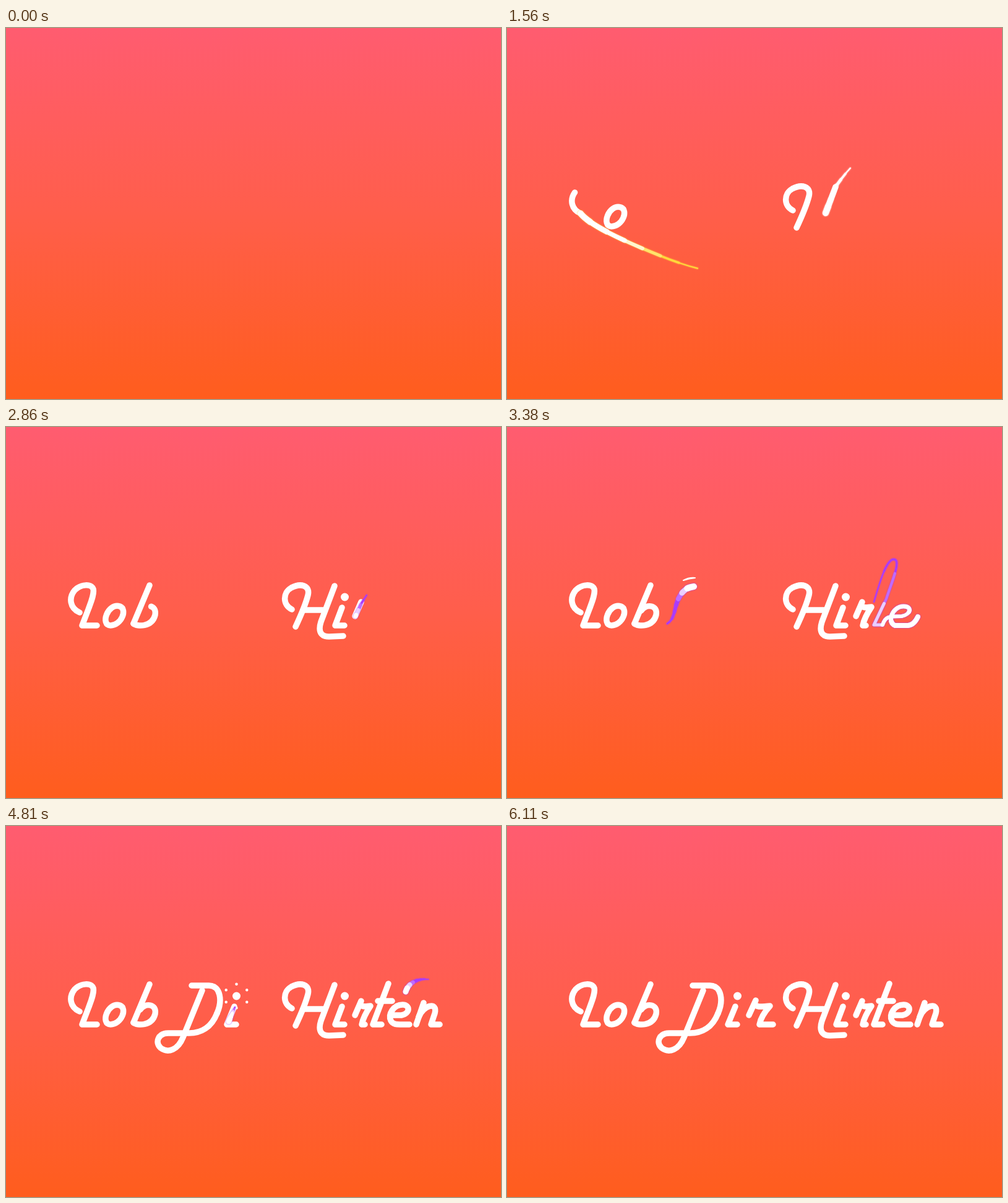
An HTML page without scripts that plays this animation: 800 px wide and 600 px high, repeating every 7020 ms.

```html
<!DOCTYPE html>
<html lang="de">
<head>
<meta charset="utf-8">
<title>Lob Dir Hirten</title>
<style>
/* One stepped clock drives everything: --a is the start tick, --d the length in ticks. */
@property --t { syntax: "<number>"; inherits: true; initial-value: 0; }
@keyframes clock { from { --t: 0; } to { --t: 54; } }

html, body { margin: 0; width: 100%; height: 100%; overflow: hidden; }
body { background: linear-gradient(#ff5c70, #ff5e4b 50%, #ff5d1d); }
svg {
  display: block; width: 100%; height: 100%;
  fill: none; stroke: #fff; stroke-linecap: round; stroke-linejoin: round;
  animation: clock 7.02s steps(54) infinite;
}
.g path, .s use, .k path, .dot, .burst { --p: calc((var(--t) - var(--a)) / var(--d)); }

/* letter strokes */
.g path {
  stroke-width: 9.5;
  stroke-dasharray: 1px 2px;
  stroke-dashoffset: calc(1px - 1px * clamp(0, var(--p), 1));
  opacity: clamp(0, var(--p) * 999, 1);
}

/* tapered streaks: stacked dashes, each shorter, wider and whiter */
.s { --len: 100; --m: 2; --w: 10; --c: #fff; --from: 1.5; filter: drop-shadow(0 0 .8px var(--c)); }
.s use {
  --h: calc(var(--p) * (100 + var(--len)));
  --l: calc(var(--len) * (1 - var(--i) / 7));
  stroke: color-mix(in srgb, #fff clamp(0%, (var(--i) - var(--from)) * 50%, 100%), var(--c));
  stroke-width: calc((var(--m) + (var(--w) - var(--m)) * var(--i) / 6) * 1px);
  stroke-dasharray: calc(var(--l) * 1px) 400px;
  stroke-dashoffset: calc((var(--l) - var(--h)) * 1px);
}
.s use, .k path, .burst { opacity: clamp(0, min(var(--p), 1 - var(--p)) * 999, 1); }
.s use:nth-child(1) { --i: 0; }
.s use:nth-child(2) { --i: 1; }
.s use:nth-child(3) { --i: 2; }
.s use:nth-child(4) { --i: 3; }
.s use:nth-child(5) { --i: 4; }
.s use:nth-child(6) { --i: 5; }
.s use:nth-child(7) { --i: 6; }

.s.yellow { --c: #ffd93b; }
.s.cyan { --c: #3ad3e8; }
.s.violet { --c: #a93bff; }
.s.green { --c: #3dff8e; }
.s.deep { --from: 3.5; }

/* thin speed lines */
.k path { fill: #fff; stroke-width: var(--sw, 1px); }

.dot {
  --q: clamp(0, var(--p), 1);
  fill: #fff; stroke: none;
  opacity: clamp(0, var(--p) * 999, 1);
  transform: translate(calc((1 - var(--q)) * var(--x) * 1px), calc((1 - var(--q)) * var(--y) * 1px));
}
.burst {
  r: calc(10px + 28px * clamp(0, var(--p), 1));
  stroke-width: 4.5; stroke-dasharray: 0 1; stroke-dashoffset: .5;
}
</style>
</head>
<body>
<svg viewBox="0 0 800 600" role="img" aria-label="Lob Dir Hirten">
  <defs>
    <path id="sweepL" pathLength="100" d="M476 305C452 350 430 398 385 399C340 400 290 386 247 368C190 345 135 320 119 300"/>
    <path id="sweepH" pathLength="100" d="M752 310C730 345 700 368 661 383C610 408 560 412 522 403C485 392 468 320 462 295"/>
    <path id="curlO" pathLength="100" d="M158 345L185 308C193 292 185 286 176 288C158 292 155 320 170 320H190L210 295"/>
    <path id="armH" pathLength="100" d="M610 190Q570 200 531 257L509 315"/>
    <path id="dash" pathLength="100" d="M240 316C300 300 350 275 403 244L425 228"/>
    <path id="tipB" pathLength="100" d="M223 272C220 262 228 258 233 255"/>
    <path id="hookI" pathLength="100" d="M542 298L532 320H546L558 285"/>
    <path id="diveR" pathLength="100" d="M640 202C620 215 590 260 574 286L565 306"/>
    <path id="loopE" pathLength="100" d="M593 283C600 260 612 214 625 214C638 214 622 250 613 278L593 320H607C611 307 616 306 638 306C653 303 655 290 641 290C622 290 614 316 627 321H648Q658 320 664 307"/>
    <path id="startD" pathLength="100" d="M259 318C275 308 268 285 284 267C290 260 296 259 302 258"/>
    <path id="loopD" pathLength="100" d="M341 303C332 326 315 335 296 335H262C246 335 240 350 250 359C262 368 278 362 286 342C300 305 330 222 356 207"/>
    <path id="bowN" pathLength="100" d="M680 305C675 318 685 322 700 321C735 318 748 298 746 284C738 262 715 250 687 249"/>
    <path id="dropE" pathLength="100" d="M683 248C665 246 650 254 646 268"/>
    <path id="tipI" pathLength="100" d="M370 293L360 316"/>
    <path id="sweepR" pathLength="100" d="M460 330C448 378 312 395 296 360C302 340 370 330 400 288"/>
  </defs>

  <g class="g">
    <!-- Lob -->
    <path pathLength="1" style="--a:11;--d:4" d="M119 300C103 293 101 276 111 264C121 254 138 253 141 262C143 270 137 284 133 295L123 321H147"/>
    <path pathLength="1" style="--a:8;--d:3" d="M184 290C164 284 152 321 169 321C186 321 197 295 184 290"/>
    <path pathLength="1" style="--a:14;--d:3" d="M206 318L232 256"/>
    <path pathLength="1" style="--a:19;--d:4" d="M206 318C212 323 236 324 241 304C244 288 226 285 217 297"/>
    <!-- Dir -->
    <path pathLength="1" style="--a:26;--d:5" d="M300 258H328C347 258 350 283 341 303"/>
    <path pathLength="1" style="--a:32;--d:3" d="M341 303C332 326 315 335 296 335H262C246 335 240 350 250 359C262 368 278 362 286 342L317 266"/>
    <path pathLength="1" style="--a:34;--d:3" d="M369 292L357 321H372"/>
    <path pathLength="1" style="--a:43;--d:2" d="M402 282L391 306"/>
    <path pathLength="1" style="--a:44;--d:3" d="M400 288C405 295 415 291 425 291C416 301 410 310 408 321H430"/>
    <!-- Hirten -->
    <path pathLength="1" style="--a:9;--d:3" d="M462 295C447 288 447 268 461 260C476 252 492 256 488 272C484 288 475 308 468 323"/>
    <path pathLength="1" style="--a:11;--d:3" d="M531 257L509 315C503 334 512 339 522 339L545 338"/>
    <path pathLength="1" style="--a:13;--d:2" d="M480 296H515"/>
    <path pathLength="1" style="--a:17;--d:3" d="M543 292L532 321H547"/>
    <path pathLength="1" style="--a:20;--d:2" d="M574 283L564 306"/>
    <path pathLength="1" style="--a:22;--d:3" d="M572 289C577 294 583 291 589 291C583 300 577 310 575 321H580"/>
    <path pathLength="1" style="--a:33;--d:3" d="M618 255L593 321H607"/>
    <path pathLength="1" style="--a:35;--d:2" d="M601 283H624"/>
    <path pathLength="1" style="--a:26;--d:3" d="M625 306H639C654 303 653 289 641 289C626 289 617 305 622 315C626 322 634 321 640 321H652"/>
    <path pathLength="1" style="--a:31;--d:2" d="M675 286L663 321"/>
    <path pathLength="1" style="--a:33;--d:3" d="M667 309C674 290 698 283 693 303L687 321H701"/>
  </g>

  <circle class="dot" cx="547.5" cy="275" r="6.5" style="--a:13;--d:3;--x:40;--y:-125"/>
  <circle class="dot" cx="372.5" cy="275" r="6.5" style="--a:34;--d:3;--x:0;--y:-18"/>
  <circle class="burst" cx="372.5" cy="275" pathLength="6" style="--a:36;--d:3"/>

  <g class="s yellow" style="--a:1;--d:16.3;--len:52">
    <use href="#sweepL"/><use href="#sweepL"/><use href="#sweepL"/><use href="#sweepL"/><use href="#sweepL"/><use href="#sweepL"/><use href="#sweepL"/>
  </g>
  <g class="s cyan" style="--a:4;--d:8">
    <use href="#curlO"/><use href="#curlO"/><use href="#curlO"/><use href="#curlO"/><use href="#curlO"/><use href="#curlO"/><use href="#curlO"/>
  </g>
  <g class="s" style="--a:6;--d:4;--len:37;--m:1">
    <use href="#sweepH"/><use href="#sweepH"/><use href="#sweepH"/><use href="#sweepH"/><use href="#sweepH"/><use href="#sweepH"/><use href="#sweepH"/>
  </g>
  <g class="s" style="--a:9;--d:5;--len:50">
    <use href="#armH"/><use href="#armH"/><use href="#armH"/><use href="#armH"/><use href="#armH"/><use href="#armH"/><use href="#armH"/>
  </g>
  <g class="s yellow deep" style="--a:14;--d:5.7;--len:65">
    <use href="#dash"/><use href="#dash"/><use href="#dash"/><use href="#dash"/><use href="#dash"/><use href="#dash"/><use href="#dash"/>
  </g>
  <g class="s cyan" style="--a:15;--d:4">
    <use href="#tipB"/><use href="#tipB"/><use href="#tipB"/><use href="#tipB"/><use href="#tipB"/><use href="#tipB"/><use href="#tipB"/>
  </g>
  <g class="s violet" style="--a:14;--d:6">
    <use href="#hookI"/><use href="#hookI"/><use href="#hookI"/><use href="#hookI"/><use href="#hookI"/><use href="#hookI"/><use href="#hookI"/>
  </g>
  <g class="s violet" style="--a:18;--d:5;--len:50">
    <use href="#diveR"/><use href="#diveR"/><use href="#diveR"/><use href="#diveR"/><use href="#diveR"/><use href="#diveR"/><use href="#diveR"/>
  </g>
  <g class="s violet" style="--a:22;--d:8;--w:8">
    <use href="#loopE"/><use href="#loopE"/><use href="#loopE"/><use href="#loopE"/><use href="#loopE"/><use href="#loopE"/><use href="#loopE"/>
  </g>
  <g class="s violet deep" style="--a:23;--d:6;--m:3;--w:10">
    <use href="#startD"/><use href="#startD"/><use href="#startD"/><use href="#startD"/><use href="#startD"/><use href="#startD"/><use href="#startD"/>
  </g>
  <!-- white rim below a green core -->
  <g class="s" style="--a:28;--d:8;--m:8;--w:9">
    <use href="#loopD"/><use href="#loopD"/><use href="#loopD"/><use href="#loopD"/><use href="#loopD"/><use href="#loopD"/><use href="#loopD"/>
  </g>
  <g class="s green deep" style="--a:28;--d:8;--m:2.5;--w:8">
    <use href="#loopD"/><use href="#loopD"/><use href="#loopD"/><use href="#loopD"/><use href="#loopD"/><use href="#loopD"/><use href="#loopD"/>
  </g>
  <g class="s violet" style="--a:28;--d:8;--m:1.5;--w:8;--from:2.5">
    <use href="#bowN"/><use href="#bowN"/><use href="#bowN"/><use href="#bowN"/><use href="#bowN"/><use href="#bowN"/><use href="#bowN"/>
  </g>
  <g class="s violet deep" style="--a:34;--d:6;--m:1.5;--w:9">
    <use href="#dropE"/><use href="#dropE"/><use href="#dropE"/><use href="#dropE"/><use href="#dropE"/><use href="#dropE"/><use href="#dropE"/>
  </g>
  <g class="s violet" style="--a:35;--d:4;--w:9;--from:.5">
    <use href="#tipI"/><use href="#tipI"/><use href="#tipI"/><use href="#tipI"/><use href="#tipI"/><use href="#tipI"/><use href="#tipI"/>
  </g>
  <g class="s yellow" style="--a:40;--d:7;--len:40">
    <use href="#sweepR"/><use href="#sweepR"/><use href="#sweepR"/><use href="#sweepR"/><use href="#sweepR"/><use href="#sweepR"/><use href="#sweepR"/>
  </g>

  <g class="k">
    <path style="--a:6;--d:4;--sw:1.6px" d="M168 274Q182 265 195 274Q182 269 168 274"/>
    <path style="--a:6;--d:4" d="M300 418Q345 423 397 416Q345 419 300 418"/>
    <path style="--a:6;--d:4" d="M518 420Q550 433 622 419Q550 429 518 420"/>
    <path style="--a:24;--d:4;--sw:2px" d="M285 248Q294 243 304 244Q294 245 285 248"/>
    <path style="--a:30;--d:4;--sw:1.8px" d="M688 266Q727 268 731 291Q725 270 688 266"/>
    <path style="--a:30;--d:4;--sw:.8px" d="M356 196Q358 194 360 195"/>
  </g>
</svg>
</body>
</html>
```
